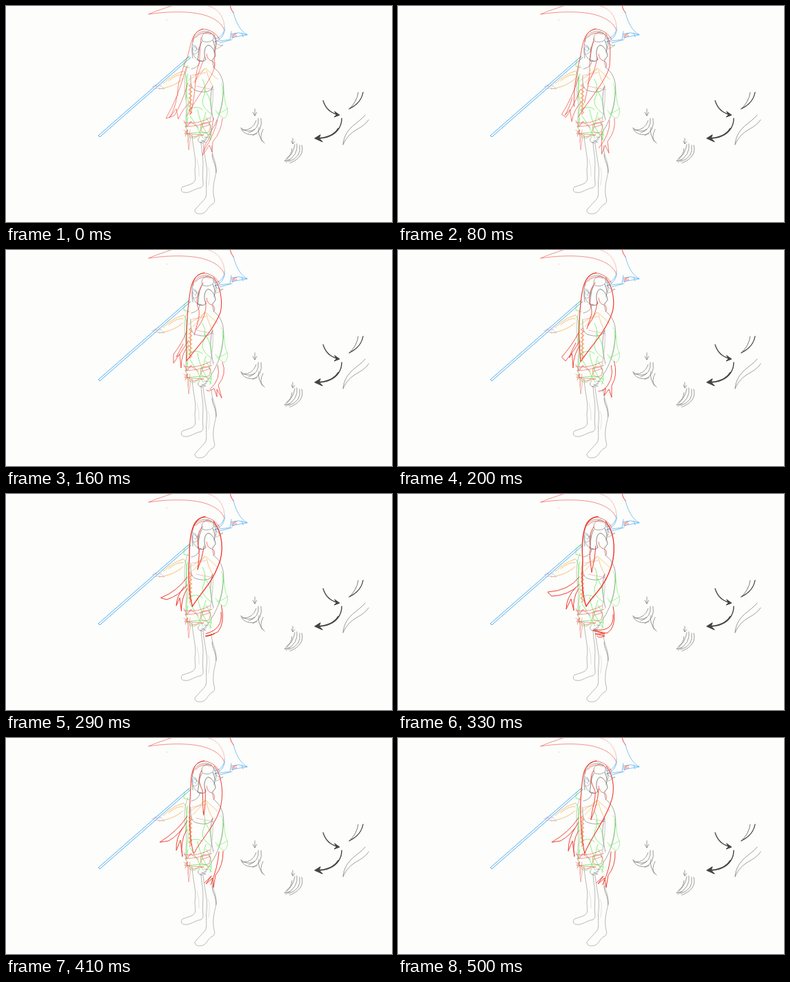
Recreate the animation shown at these times as an HTML page. Size 560 by 315 pixels, loop 540 ms.

```html
<!DOCTYPE html>
<html lang="en">
<head>
<meta charset="utf-8">
<title>Hair sway sketch</title>
<style>
  html, body { margin: 0; width: 100%; height: 100%; overflow: hidden; background: #fdfdfb; }
  svg { display: block; width: 100vw; height: 100vh; }
  path { fill: none; stroke-linecap: round; stroke-linejoin: round; }
  .solid { fill: #444; }
</style>
</head>
<body>
<svg viewBox="0 0 560 315">
  <!-- scythe -->
  <g stroke="#f0605a" stroke-width=".7">
    <path d="M207 12C217 7 229 4 242-1M207 12C240 7 270 8 287 13C304 18 314 26 317 36"/>
    <path d="M290-1C305 2 315 12 317 29" stroke-width=".4"/>
    <path d="M325-1Q326 5 330 10" stroke-width="1.1"/>
    <path d="M327 42l8-2-8 4 8-1-7 4 4-7" stroke-width=".5"/>
    <path d="M232 20l3 1" stroke-width=".25"/>
  </g>
  <g stroke="#3ba3f2" stroke-width=".65">
    <path d="M317 30C318 40 314 48 303 52M316 37C313 44 309 47 302 48M303 52L325 49L327 37M310 54L328 49"/>
    <path d="M330 10C333 22 339 36 350 42L327 46M350 42L337 39L327 41M342 39l2 6"/>
    <path d="M266 73L134 189L136 191L268 75" stroke-width=".9"/>
    <path d="M271 58l6 5M270 62l5 4" stroke-width=".4"/>
  </g>

  <!-- body construction -->
  <g stroke="#777" stroke-width=".65">
    <path d="M271 76C267 52 273 37 290 37C302 38 307 49 304 62M271 60C269 70 274 79 284 80"/>
    <path d="M284 47C284 37 298 35 301 44C303 51 292 55 285 51Z"/>
    <path d="M284 52C279 60 280 70 278 79Q285 83 290 78C286 70 288 59 293 57C299 58 303 65 304 73L300 78M300 50Q305 60 302 68" stroke-width=".9"/>
    <path d="M303 52Q308 59 315 57L305 63M271 56l8 8M272 70q7 2 8-10M274 57q5 5 1 9" stroke-width=".5"/>
    <path d="M281 80Q281 89 269 92M300 78Q299 88 304 92C312 98 318 113 315 130C314 149 308 163 302 175C297 183 291 196 282 199"/>
    <path d="M268 101C267 116 270 123 278 124C289 127 298 125 300 117M299 118C295 137 297 150 301 166"/>
    <path d="M300 117C301 138 299 153 295 173M264 87C258 100 258 119 261 135C263 150 260 161 261 178" stroke-width=".4"/>
    <path d="M281 191q-5 4 0 8l5 1 5-6m-7 2l6 3m-2-8l5 1" stroke-width=".6"/>
  </g>
  <g stroke="#8c8c8c" stroke-width=".6">
    <path d="M270 188C271 209 277 223 274 238C274 249 277 255 270 259L256 264C253 267 254 272 260 272C267 273 274 266 283 265Q287 262 286 258C284 242 288 231 284 211L283 199"/>
    <path d="M286 201C288 222 293 234 291 251C289 266 294 278 286 284L275 296C272 300 276 304 283 303C292 302 292 292 300 289Q304 286 302 280C298 264 304 251 305 240C305 225 298 218 298 204"/>
    <path d="M299 216C299 225 305 231 305 243" stroke="#666"/>
    <path d="M277 223q4 12 3 25M293 235q4 8 1 26" stroke-width=".25"/>
  </g>
  <g stroke="#f3a63c" stroke-width=".7">
    <path d="M228 113C238 104 248 97 258 95M222 121C237 119 248 114 257 106M236 109Q248 99 257 100"/>
    <path d="M264 109L290 91L307 107M271 112Q282 102 288 91M291 94Q294 108 300 117" stroke-width=".6"/>
    <path d="M268 114l-3 2 5 3-5 3 5 3-5 3 5 3-5 3 5 3-5 3 5 3-5 3 5 3-5 3 5 3-4 3M268 114L267 158" stroke="#f1783c"/>
  </g>
  <path d="M213 117l8-4m-9 5l13-2m-11 4l16 1-9-8m-5 2l7 5" stroke="#b4a6cb" stroke-width=".5"/>
  <g stroke="#5cea4e" stroke-width=".7">
    <path d="M266 75Q257 76 258 88L266 90M259 96C266 109 258 121 264 137C265 150 260 160 263 171M264 99C260 111 263 123 261 137"/>
    <path d="M285 107C290 116 290 126 286 134C282 145 291 153 299 158M287 121Q297 133 298 148M265 151Q276 144 285 151"/>
    <path d="M312 113C319 122 315 140 321 149Q323 158 317 164Q309 161 304 152M314 119C316 133 312 147 309 158M306 157Q315 155 321 150" stroke-width=".55"/>
    <path d="M264 163C259 180 262 192 272 193C283 191 284 174 290 155M278 151C281 169 288 183 298 195M267 160Q277 175 286 193M290 162Q302 178 296 196M261 187Q281 181 298 188"/>
  </g>
  <g stroke="#ef605c" stroke-width=".65">
    <path d="M258 170Q278 173 296 163M260 176Q282 175 299 168M258 167l5 9 6-8-9 8m8-7l11 8"/>
    <path d="M283 172q9-5 14 2l-2 9q-7 4-12-1zM284 177l12-4M258 181l13 10 16-3-28-2 5-6-4 10"/>
    <path d="M263 181L265 210L268 189M267 181L264 199" stroke-width=".5"/>
    <path d="M276 117l25 5M270 101l20-4" stroke-width=".4"/>
  </g>

  <!-- hair -->
  <g stroke="#ee3a2e">
    <path d="M271 52C271 40 280 33 290 34Q304 37 310 49M275 46Q283 36 298 41M291 70Q292 79 299 80Q305 84 301 90" stroke-width=".7"/>
    <path id="falls"/>
    <path id="tufts"/>
  </g>

  <!-- motion notes -->
  <g stroke="#666" stroke-width=".65">
    <path d="M361 150v10m-3-5l3 5 3-5M416 193v8m-2-4l2 4 3-3"/>
    <path d="M341 178C344 187 355 190 364 186M341 178Q350 186 361 180M343 181Q358 182 363 167M352 185Q368 180 366 164M358 189Q373 182 370 164"/>
    <path d="M367 177Q364 190 375 200M373 180Q367 191 372 198"/>
    <path d="M419 202Q417 217 404 226L412 224M422 201Q425 217 406 228M426 203Q429 221 410 227M429 203Q434 220 412 229M407 222Q414 218 415 208"/>
    <path d="M521 159C512 171 491 177 489 202M526 166C515 182 500 178 489 202"/>
  </g>
  <g stroke="#444" stroke-width="1.3">
    <path d="M460 138Q465 154 480 158"/>
    <path class="solid" d="M477 154l7 5-8 3 3-3z" stroke-width="1"/>
    <path d="M487 164C487 175 482 182 474 187" stroke-width="1.4"/>
    <path d="M482 179C475 190 464 193 450 193" stroke-width="2.2"/>
    <path class="solid" d="M456 188l-8 5 11 5-5-5z" stroke-width="1.2"/>
    <path d="M518 126Q515 142 498 150"/>
    <path d="M511 126Q509 140 498 150" stroke-width=".7"/>
  </g>
</svg>
<script>
// falls: left and right lengths. tufts: face lock, left tuft, spikes, right tail.
const poses = [
  { fallWidth: .6, tuftWidth: .6,
    falls: `M286 33C266 39 269 62 261 80C253 100 248 118 249 131
      M301 40C310 52 300 67 303 84C304 100 276 133 262 161`,
    tufts: `M283 46C280 74 282 82 278 90C274 104 276 122 268 158M288 75Q282 91 274 112
      M262 88Q250 133 232 164L244 160Q255 143 264 112
      M248 132Q245 151 237 163L247 150L250 165Q257 148 268 140
      M314 164Q312 184 300 198L299 213L295 203L285 218L289 202Q298 192 301 163M307 166Q302 188 287 211` },
  { fallWidth: 1.05, tuftWidth: .75,
    falls: `M288 33C267 36 267 61 264 86C262 111 261 134 262 162
      M301 40C311 52 315 75 311 91C300 120 274 144 262 162`,
    tufts: `M286 48C277 63 276 74 278 82C283 92 279 102 273 124M290 75Q292 96 276 116
      M262 119Q255 137 243 152L243 165Q254 149 265 132
      M257 137Q252 147 247 156L252 152L254 172Q254 152 264 140
      M314 164Q321 180 308 197L313 216L306 203L306 214L302 202Q292 208 291 204M307 168Q313 188 296 203` },
  { fallWidth: 1.25, tuftWidth: 1,
    falls: `M288 33C266 37 266 71 264 90C262 119 264 147 268 164
      M301 40C313 56 317 80 309 96C301 121 278 146 268 164`,
    tufts: `M286 47C274 60 278 73 281 82C284 92 279 95 275 106M288 76Q284 92 275 106
      M263 121Q249 143 232 160L243 159Q254 149 263 133
      M259 134Q251 147 250 158L253 150L254 172Q255 152 264 138
      M313 161Q318 183 312 199L307 214L306 203L292 211L301 202Q289 207 290 208M312 169Q316 193 297 209` },
  { fallWidth: 1.45, tuftWidth: 1,
    falls: `M290 33C267 35 266 70 268 96C266 124 268 149 273 164
      M301 40C316 58 317 89 306 115C296 140 282 148 273 164`,
    tufts: `M284 48C274 63 280 74 279 82C277 93 280 103 281 114M287 76Q286 94 281 114
      M263 121Q248 141 217 143L223 149Q248 148 263 132
      M258 136Q244 151 244 168L251 153L255 170Q253 152 262 138
      M312 164Q318 194 303 203L283 199L300 204L286 204L300 207Q291 211 289 207M312 176Q314 202 284 198` },
  { fallWidth: 1, tuftWidth: .95,
    falls: `M288 33C265 36 269 62 267 91C265 124 267 149 272 168
      M302 41C315 56 316 86 310 105C301 132 281 150 273 168`,
    tufts: `M284 47C276 61 283 70 285 77C286 91 285 101 287 112M289 75Q290 96 287 112
      M263 114Q249 136 223 152L236 150Q252 141 263 121
      M257 130Q246 146 247 164L253 149L256 173Q252 152 262 134
      M315 165Q315 187 304 200L301 218L300 204L290 213L298 201Q292 208 288 211M309 166Q307 190 297 214` },
  { fallWidth: 1.1, tuftWidth: .95,
    falls: `M288 33C265 38 268 61 265 90C264 119 267 150 271 170
      M302 41C314 56 315 79 308 96C300 121 278 148 271 168`,
    tufts: `M284 47C275 62 284 70 286 78C287 92 281 103 280 119M291 74Q290 96 280 119
      M262 116Q249 137 223 152L236 150Q252 141 262 123
      M257 131Q247 146 247 165L253 150L256 173Q252 152 262 135
      M315 165Q316 187 305 200L302 218L300 204L290 213L298 201Q292 208 288 211M309 166Q308 190 297 214` }
];

// Each [start, pose] holds until the next; fractional poses are in-betweens.
const holds = [[0, 0], [80, .5], [160, 1], [200, 1.5], [250, 2], [290, 2.5], [330, 3], [410, 4], [500, 5]];
const loop = 540;
const mix = (a, b, k) => a + (b - a) * k;

function mixPaths(a, b, k) {
  const goals = b.match(/\d+/g);
  let i = 0;
  return a.replace(/\d+/g, n => mix(+n, +goals[i++], k));
}

function drawStrands(id, shape, width, from, to, k) {
  const path = document.getElementById(id);
  path.setAttribute('d', mixPaths(from[shape], to[shape], k));
  path.setAttribute('stroke-width', mix(from[width], to[width], k));
}

function draw(now) {
  const t = now % loop;
  const at = holds.findLast(([start]) => start <= t)[1];
  const from = poses[Math.floor(at)], to = poses[Math.ceil(at)], k = at % 1;
  drawStrands('falls', 'falls', 'fallWidth', from, to, k);
  drawStrands('tufts', 'tufts', 'tuftWidth', from, to, k);
}

const start = performance.now();
function tick() {
  draw(performance.now() - start);
  requestAnimationFrame(tick);
}
tick();
</script>
</body>
</html>
```
